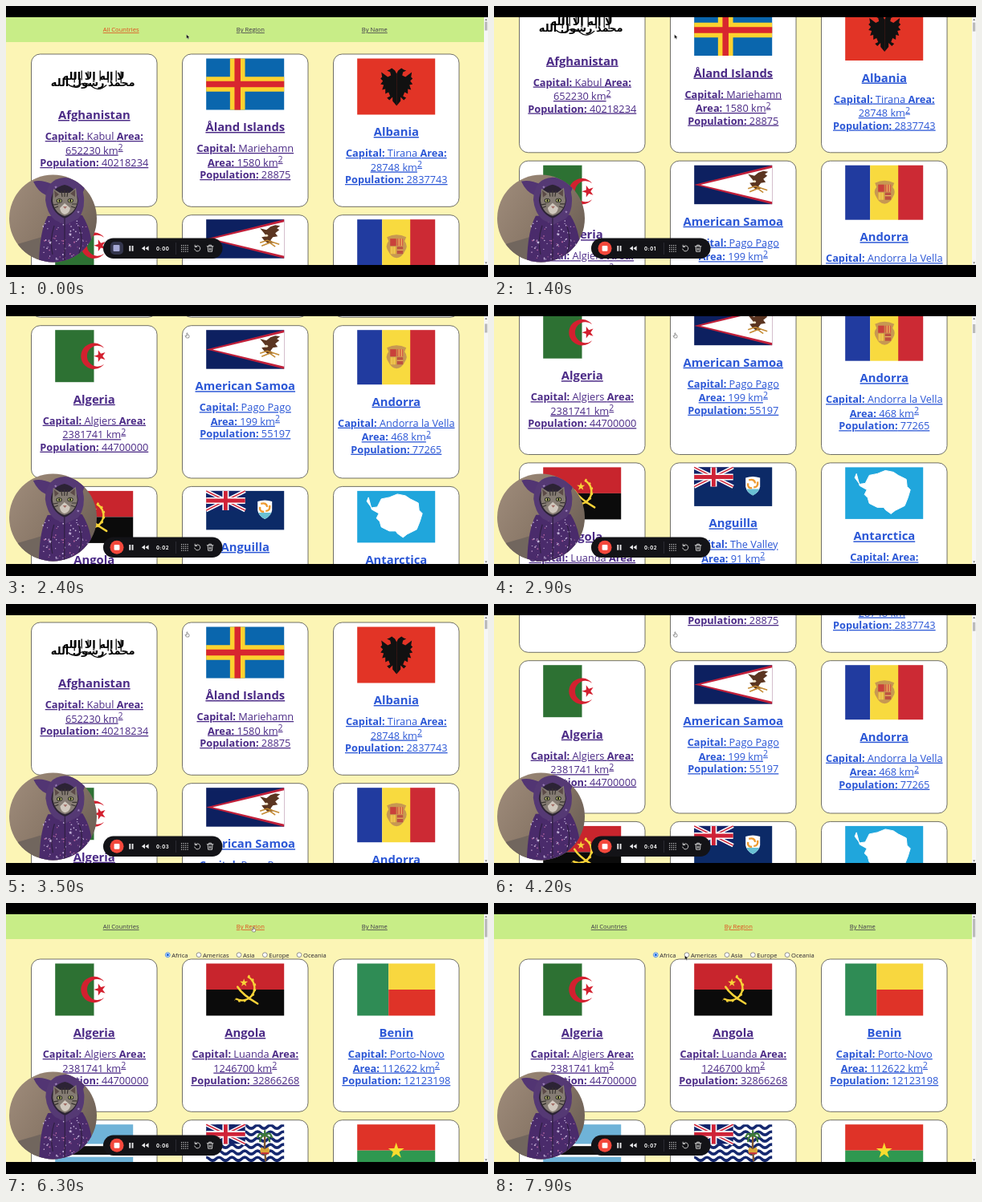
These frames come from a looping animation (600x338 px, 8000 ms). An HTML page:

```html
<!DOCTYPE html>
<html lang="en">
<head>
<meta charset="utf-8">
<title>Countries</title>
<style>
html, body { margin: 0; width: 100%; height: 100%; overflow: hidden; background: #000; }
svg { display: block; width: 600px; height: 338px; }
text { font-family: "Open Sans", "Noto Sans", sans-serif; }
.mid { text-anchor: middle; }
.name { font-size: 14.8px; font-weight: 700; text-decoration: underline; }
.line { font-size: 12.75px; text-decoration: underline; }
.line .key { font-weight: 700; }
.small { font-size: 7.6px; fill: #27242e; }
.nav { text-decoration: underline; fill: #3a3348; }
.nav.on { fill: #e04a1c; }
.script { font: 700 13px "DejaVu Sans", sans-serif; }
#clock { font: 700 6px Inter, sans-serif; letter-spacing: .55px; fill: #fff; }
</style>
</head>
<body>
<svg viewBox="0 0 600 338">
  <defs>
    <clipPath id="view"><rect y="14" width="600" height="309"/></clipPath>
    <clipPath id="lens"><circle cx="58.5" cy="265" r="54.5"/></clipPath>
    <clipPath id="flag"><rect width="97" height="48.5"/></clipPath>
    <linearGradient id="wall" x2="1" y2=".6">
      <stop stop-color="#a08d7c"/><stop offset=".55" stop-color="#8b7969"/><stop offset="1" stop-color="#6e6157"/>
    </linearGradient>
  </defs>
  <rect width="600" height="338"/>
  <g clip-path="url(#view)">
    <rect y="14" width="600" height="309" fill="#fcf5b5"/>
    <g id="all"></g>
    <g id="region"></g>
    <rect x="595" y="14" width="5" height="309" fill="#f6f6f6"/>
    <path d="M596.2 18l1.4-2 1.4 2zM596.2 319.5l1.4 2 1.4-2z" fill="#666"/>
    <rect id="thumb" x="596" width="3.2" fill="#bbb"/>
  </g>
  <g clip-path="url(#lens)">
    <rect x="4" y="210" width="110" height="110" fill="url(#wall)"/>
    <path d="M4 300L45 288 114 296V320H4Z" fill="#71665e"/>
    <g id="cat"></g>
  </g>
  <rect x="121" y="289.5" width="148.5" height="25.5" rx="12.7" fill="#131317"/>
  <g id="idle">
    <rect x="130" y="294" width="16" height="16" rx="5" fill="#34364d"/>
    <rect x="133.5" y="298" width="8" height="8" rx="1" fill="#a6a9d6"/>
  </g>
  <g id="live">
    <circle cx="138" cy="302.3" r="8.5" fill="#f4483c"/>
    <rect x="134.6" y="298.9" width="6.8" height="6.8" rx="1.2" fill="#fff"/>
  </g>
  <path d="M153.3 299h1.9v6.8h-1.9zM156.6 299h1.9v6.8h-1.9zM173 299.3v6l-4.2-3zM177.6 299.3v6l-4.2-3z" fill="#e8e8ea"/>
  <text id="clock" x="187" y="304.5"></text>
  <path d="M211.5 295v15" stroke="#33333a" stroke-width=".8"/>
  <g id="dots" fill="#ddd"></g>
  <g fill="none" stroke="#ddd" stroke-width=".9" stroke-linecap="round">
    <path d="M235.6 300.1a3.5 3.5 0 1 1-.8 2.9M235.2 298.2v2.3h2.3"/>
    <path d="M250.3 299.7h7.6M252.6 299.5v-1.3h3v1.3M251.2 300l.5 6.3h4.8l.5-6.3M253.3 302v2.5M254.9 302v2.5"/>
  </g>
  <path id="arrow" d="M0 0V5.2L1.3 4.1 2.2 6 3.1 5.6 2.3 3.8H4Z" fill="#111" stroke="#fff" stroke-width=".3"/>
  <path id="hand" d="M-.6-2.8Q0-3.4.5-2.8V-.8L2.2-.3Q2.8 0 2.6.8L2.1 3H-1L-2.5.8Q-2.3 0-1.5.4L-.6 1Z" fill="#fff" stroke="#555" stroke-width=".6"/>
</svg>
<script>
const $ = id => document.getElementById(id);
const rect = (x, y, w, h, fill) => `<rect x="${x}" y="${y}" width="${w}" height="${h}" fill="${fill}"/>`;
const path = (d, fill, more = '') => `<path d="${d}" fill="${fill}" ${more}/>`;
const line = (d, stroke, width, more = '') => path(d, 'none', `stroke="${stroke}" stroke-width="${width}" ${more}`);
const oval = (x, y, rx, ry, fill) => `<ellipse cx="${x}" cy="${y}" rx="${rx}" ry="${ry}" fill="${fill}"/>`;
const at = (x, y, body, more = '') => `<g transform="translate(${x} ${y}) ${more}">${body}</g>`;

function star(x, y, r, fill, turn = -90) {
  const points = Array.from({ length: 10 }, (_, i) => {
    const a = (turn + i * 36) * Math.PI / 180, d = i % 2 ? r * .39 : r;
    return `${x + d * Math.cos(a)},${y + d * Math.sin(a)}`;
  });
  return `<polygon points="${points.join(' ')}" fill="${fill}"/>`;
}

function random(seed) {
  return () => (seed = seed * 16807 % 2147483647) / 2147483647;
}

const unionJack = rect(0, 0, 48.5, 24.2, '#12246a') +
  line('M0 0L48.5 24.2M48.5 0L0 24.2', '#fff', 4.6) +
  line('M0 0L48.5 24.2M48.5 0L0 24.2', '#cf2338', 1.6) +
  line('M24.2 0V24.2M0 12.1H48.5', '#fff', 8) +
  line('M24.2 0V24.2M0 12.1H48.5', '#cf2338', 4.8);

const halfEagle = path('M0-16L2-20 6-23 9-21 12-20 8-18 7-14 11-12 19-18 18-12 20-10 17-7 20-3 16-2 18 4 14 3 14 9 10 7 8 12 12 14 9 17 5 13 5 18 0 24Z', '#111');

const flags = {
  afghanistan: [49, () => rect(0, 0, 97, 49, '#fff') +
    '<text class="mid script" x="48" y="26">لا إله إلا الله</text>' +
    '<text class="mid script" x="47" y="34">محمد رسول الله</text>' +
    line('M24 17V30M33 15V27M41 16V26M56 15V28M66 16V30M76 15V29M82 16V31M16 32Q22 38 30 33T46 35 64 33', '#111', 1.3)],
  aland: [64, () => rect(0, 0, 97, 64, '#0a66ad') +
    line('M39 0V64M0 32H97', '#fcd22f', 18.7) + line('M39 0V64M0 32H97', '#d8262f', 7.5)],
  albania: [70, () => rect(0, 0, 97, 70, '#e23426') +
    at(49, 35, halfEagle + at(0, 0, halfEagle, 'scale(-1 1)'))],
  algeria: [65, () => rect(0, 0, 48.5, 65, '#2d7133') + rect(48.5, 0, 48.5, 65, '#fff') +
    path('M61 22.5A16.2 16.2 0 1 0 61 42.5A13 13 0 1 1 61 22.5Z', '#d3202f') + star(56, 32.5, 7.8, '#d3202f', 180)],
  samoa: [48.5, () => rect(0, 0, 97, 48.5, '#0d2060') +
    path('M0 24.2L97 0V48.5Z', '#c2203a') + path('M8 24.2L97 3V45.5Z', '#fff') +
    path('M67 11L75 13 80 9 86 7 92 8 88 11 91 13 86 17 89 21 83 22 80 26 84 29 77 30 72 26 69 22 75 21 72 17Z', '#5b3521') +
    line('M67 29L76 26 91 31M69 33L79 29 86 34', '#c48a32', 1.5) + oval(75, 20, 2, 1.5, '#efe3c8')],
  andorra: [68, () => rect(0, 0, 31, 68, '#213b9f') + rect(31, 0, 36, 68, '#f8da3f') + rect(66, 0, 31, 68, '#cc2a34') +
    path('M37 22Q49 16 61 22L59 27Q64 33 59 40 56 47 49 48 42 47 39 40 34 33 39 27Z', '#c79852') +
    rect(41, 24, 7.5, 9, '#c9413b') + rect(49.5, 24, 7.5, 9, '#d55b43') +
    rect(41, 34, 7.5, 9, '#e8b73d') + rect(49.5, 34, 7.5, 9, '#bd5141') +
    line('M43 34V43M46 34V43M52 24V33M55 24V33M49.5 38H57', '#f1d169', 1)],
  angola: [65, () => rect(0, 0, 97, 32.5, '#c8252d') + rect(0, 32.5, 97, 32.5, '#0b0b0b') +
    line('M52 16.5A15.5 15.5 0 1 1 37 44', '#f8d338', 2.4) +
    line('M52 15.5A16.5 16.5 0 1 1 36 44.5', '#f8d338', 3.4, 'stroke-dasharray="2.4 4"') +
    line('M39 29Q45 39 64 50', '#f8d338', 2.5, 'stroke-linecap="round"') + star(47, 24, 5.3, '#f8d338')],
  anguilla: [48.5, () => rect(0, 0, 97, 48.5, '#0c2a67') + unionJack +
    path('M64 13Q73 10 82 13V24Q81 31 73 35 65 31 64 24Z', '#fff') + path('M65 27H81Q79 32 73 35 67 32 65 27Z', '#69c0d3') +
    line('M68 16Q75 14 76 20M79 18Q80 25 74 25M67 20Q66 26 72 26', '#ee9a30', 2.4)],
  antarctica: [64.5, () => rect(0, 0, 97, 64.5, '#20a6dc') +
    path('M14 8L12 13 18 21 25 20 30 10 40 8 50 4 60 6 66 10 76 15 77 24 81 28 78 38 74 48 62 54 57 58 50 53 48 50 40 50 30 45 28 38 24 34 27 28 18 23Z', '#fff', 'stroke="#fff" stroke-linejoin="round"')],
  benin: [65, () => rect(0, 0, 39, 65, '#2f8c55') + rect(39, 0, 58, 32.5, '#f8d73f') + rect(39, 32.5, 58, 32.5, '#df3328')],
  botswana: [65, () => rect(0, 0, 97, 65, '#6fb3d8') + rect(0, 24.3, 97, 16.2, '#fff') + rect(0, 27, 97, 10.8, '#111')],
  ocean: [48.5, () => {
    const wave = y => line(`M-4 ${y}` + 'q4-4 8 0t8 0'.repeat(7), '#15286f', 3.6);
    return rect(0, 0, 97, 48.5, '#fff') +
      `<g clip-path="url(#flag)">${[3, 11, 19, 27, 35, 43].map(wave).join('')}</g>` + unionJack +
      line('M73 14Q72 30 74 46', '#7d5530', 2.4) +
      line('M73 14Q66 8 64 17M73 14Q79 7 82 17M73 14Q67 14 67 22M73 14Q79 14 79 22M73 14V7', '#3d7b39', 2.3) +
      path('M67 32L69 28 73 31 77 28 79 32 78 37H68Z', '#dba83a') + rect(68, 35, 10, 2, '#c32c3a');
  }],
  burkina: [65, () => rect(0, 0, 97, 32.5, '#df3328') + rect(0, 32.5, 97, 32.5, '#2f9850') + star(48.5, 33, 10.5, '#f8dc2f')]
};

const visited = '#4b2a86', fresh = '#2b57d6';
const facts = (capital, area, people, wrap) =>
  wrap ? [`Capital: ${capital}`, `Area: ${area} km2`, `Population: ${people}`]
       : [`Capital: ${capital} Area:`, `${area} km2`, `Population: ${people}`];
const algeria = ['algeria', 'Algeria', visited, facts('Algiers', 2381741, 44700000)];
const angola = ['angola', 'Angola', visited, facts('Luanda', 1246700, 32866268)];
const world = [
  ['afghanistan', 'Afghanistan', visited, facts('Kabul', 652230, 40218234)],
  ['aland', 'Åland Islands', visited, facts('Mariehamn', 1580, 28875, true)],
  ['albania', 'Albania', fresh, facts('Tirana', 28748, 2837743)],
  algeria,
  ['samoa', 'American Samoa', fresh, facts('Pago Pago', 199, 55197, true)],
  ['andorra', 'Andorra', fresh, facts('Andorra la Vella', 468, 77265, true)],
  angola,
  ['anguilla', 'Anguilla', fresh, facts('The Valley', 91, 13452, true)],
  ['antarctica', 'Antarctica', fresh, ['Capital: Area:', '14000000 km2', 'Population: 1000']]
];
const africa = [
  algeria, angola,
  ['benin', 'Benin', fresh, facts('Porto-Novo', 112622, 12123198, true)],
  ['botswana', 'Botswana', fresh, []],
  ['ocean', 'British Indian Ocean', fresh, []],
  ['burkina', 'Burkina Faso', fresh, []]
];

const markUp = s => s.replace(/\w+:/g, '<tspan class="key">$&</tspan>')
  .replace('km2', 'km<tspan dy="-4.5" font-size="10.5">2</tspan>');

function card([key, name, color, lines], i, top) {
  const [height, draw] = flags[key], base = height + 5.5;
  const rows = lines.map((s, n) =>
    `<text class="mid line" x="78.3" y="${base + [52.5, 70, 85.5][n]}">${markUp(s)}</text>`).join('');
  return at(31.5 + i % 3 * 188, top + Math.floor(i / 3) * 200.7,
    `<rect width="156.5" height="190.3" rx="11" fill="#fff" stroke="#4c4c48" stroke-width=".8"/>` +
    at(29.7, 5.5, draw()) +
    `<g fill="${color}"><text class="mid name" x="78.3" y="${base + 26.5}">${name}</text>${rows}</g>`);
}

function header(active) {
  return rect(0, 14, 600, 31, '#c8ed87') + ['All Countries', 'By Region', 'By Name'].map((s, i) =>
    `<text class="small nav ${i === active ? 'on' : ''}" x="${[120.7, 286.8, 442.8][i]}" y="32.3">${s}</text>`).join('');
}

const radios = [['Africa', 201.3], ['Americas', 240], ['Asia', 290], ['Europe', 322.3], ['Oceania', 365]].map(([s, x], i) =>
  `<circle cx="${x}" cy="64.7" r="2.9" fill="#fff" stroke="${i ? '#777' : '#1a6be0'}" stroke-width=".8"/>` +
  (i ? '' : oval(x, 64.7, 1.7, 1.7, '#1a6be0')) +
  `<text class="small" x="${x + 5}" y="67.5">${s}</text>`).join('');

$('all').innerHTML = header(0) + world.map((c, i) => card(c, i, 60)).join('');
$('region').innerHTML = header(1) + radios + africa.map((c, i) => card(c, i, 70)).join('');

const rnd = random(77);
const specks = Array.from({ length: 95 }, () =>
  oval(46 + rnd() * 58, 268 + rnd() * 50, .5 + rnd() * .5, .5 + rnd() * .5, rnd() < .6 ? '#c8b8dc' : '#b2649f')).join('');
$('cat').innerHTML =
  path('M52 262Q42 280 41 320H107Q110 285 95 261Z', '#4a2b6b') + specks +
  path('M50 236Q40 232 34 219 44 216 59 223ZM84 219Q90 210 97 218 100 227 94 235Z', '#523573') +
  path('M73 214Q50 215 49 242 51 259 61 267L74 273 90 265Q98 256 97 239 95 215 73 214Z', '#553974') +
  path('M73 223Q57 226 56 243 58 259 73 265 88 259 90 243 88 226 73 223Z', '#2c2335') +
  path('M58 243L59 228 67 233H79L87 227 89 243Q87 258 73 262 60 258 58 243Z', '#857c73') +
  path('M60 230L66 235 61 239ZM86 229L80 234 86 238Z', '#5c4b48') +
  line('M73 230V238M69 231L70 238M77 231L76 238M59 248L65 247M88 247L82 247M60 252L65 250M87 252L81 250', '#37322f', 1.2) +
  path('M73 246L67 252Q68 259 73 260 79 259 80 252Z', '#d0c8be') +
  oval(66.3, 243, 3.6, 2.7, '#222') + oval(80.3, 242.7, 3.6, 2.7, '#222') +
  oval(66.3, 243, 2.7, 2, '#b9bd70') + oval(80.3, 242.7, 2.7, 2, '#b9bd70') +
  oval(66.5, 243, 1, 1.8, '#111') + oval(80.2, 242.7, 1, 1.8, '#111') +
  path('M71 250H76L73.5 253Z', '#a26d65') +
  line('M73 265V318M60 274Q54 292 58 310M91 275Q97 291 91 309', '#302044', 1.3) +
  star(62, 226, 2, '#a38abf') + star(90, 257, 2, '#a38abf') + star(80, 285, 2.4, '#c8b8dc') + star(55, 295, 2.4, '#c8b8dc');

$('dots').innerHTML = Array.from({ length: 16 }, (_, i) =>
  oval(218.6 + i % 4 * 2.5, 298.6 + Math.floor(i / 4) * 2.5, .7, .7, '#ddd')).join('');

// Linear interpolation over rows of [time, value, ...].
function track(keys, t) {
  const n = keys.findIndex(k => k[0] > t);
  if (n < 0) return keys[keys.length - 1].slice(1);
  const a = keys[n - 1], b = keys[n], p = (t - a[0]) / (b[0] - a[0]);
  return a.slice(1).map((v, i) => v + (b[i + 1] - v) * p);
}
const scrollKeys = [[0, 0], [800, 0], [900, 8], [1400, 67.5], [1900, 144], [2400, 235], [2700, 275], [2900, 264.5],
  [3300, 12], [3500, 37], [3900, 150], [4200, 190], [4500, 110], [4800, 0]];
const pointerKeys = [[0, 224.6, 35.5], [2300, 224.6, 35.5], [2400, 225.5, 38], [4700, 225.5, 38], [5100, 308.5, 32],
  [6400, 308, 33], [7200, 246, 62], [7600, 237.5, 65.5]];
const show = (id, on) => $(id).setAttribute('display', on ? 'inline' : 'none');
const move = (id, x, y) => $(id).setAttribute('transform', `translate(${x} ${y})`);

function draw(now) {
  const t = Math.floor(now % 8000 / 100) * 100;
  const [scroll] = track(scrollKeys, t), [x, y] = track(pointerKeys, t);
  const byRegion = t >= 5700, link = t >= 2400 && t < 6500;
  show('all', !byRegion);
  show('region', byRegion);
  move('all', 0, -scroll);
  $('thumb').setAttribute('y', 19.5 + scroll * .017);
  $('thumb').setAttribute('height', byRegion ? 23 : 11);
  show('idle', t < 200);
  show('live', t >= 200);
  $('clock').textContent = '0:0' + Math.floor(t / 1000);
  move('cat', .4 * Math.sin(t / 8000 * 6 * Math.PI), .3 * Math.sin(t / 8000 * 10 * Math.PI));
  show('arrow', !link);
  show('hand', link);
  move('arrow', x, y);
  move('hand', x, y);
  requestAnimationFrame(draw);
}
requestAnimationFrame(draw);
</script>
</body>
</html>
```
